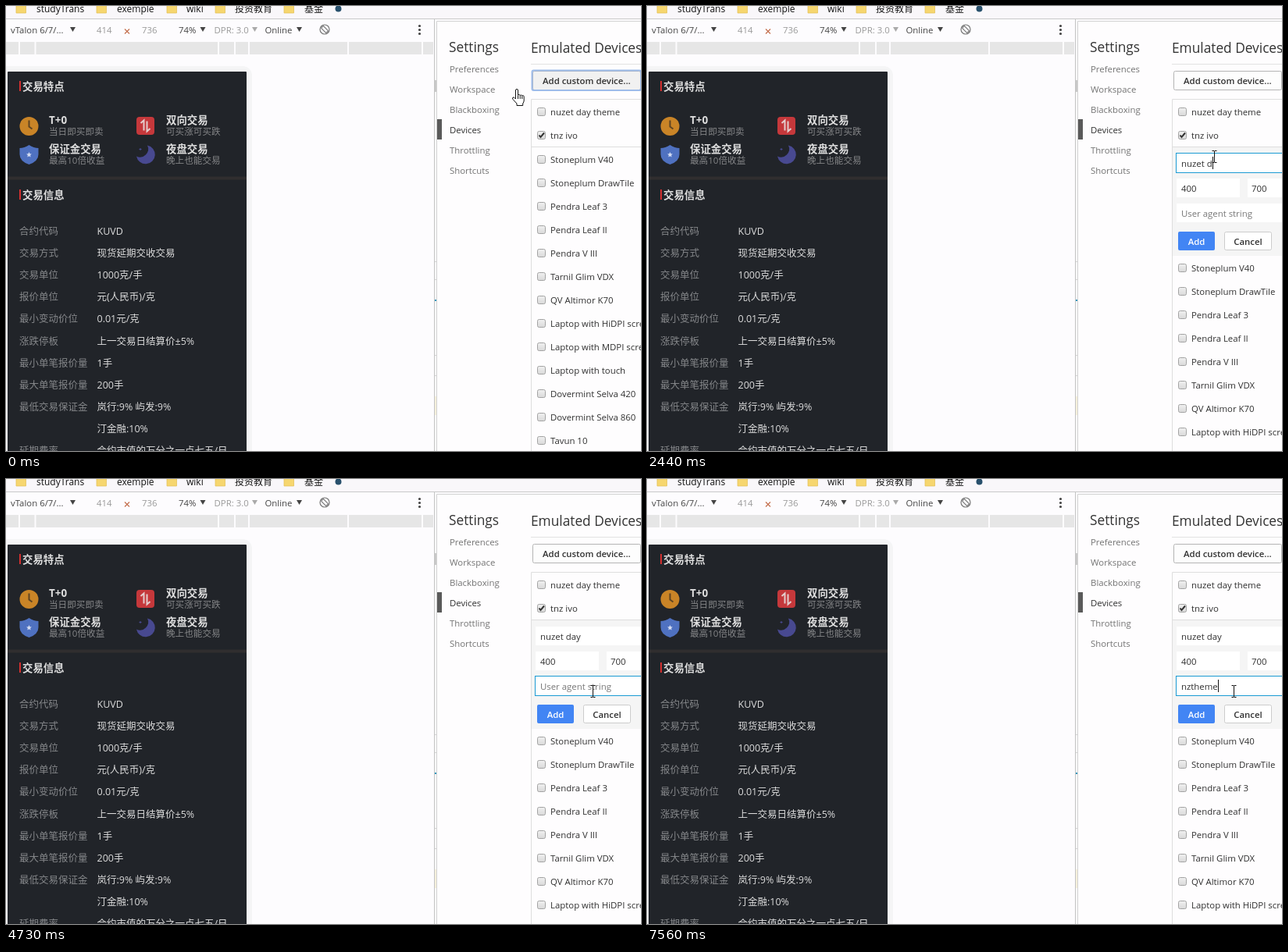
Animation of 813x570 px, one loop 7.99 s. Source, as an HTML page:

```html
<!DOCTYPE html>
<html lang="zh-CN">
<head>
<meta charset="utf-8">
<title>Device settings</title>
<style>
html, body { margin: 0; width: 100%; height: 100%; overflow: hidden; background: #fdfcfe; }
svg { display: block; width: 813px; height: 570px; }
text { font: 11.4px "Open Sans", "Noto Sans CJK SC", "Noto Sans CJK", sans-serif; fill: #303030; white-space: pre; }
.big { font-size: 17.3px; fill: #333; }
.book { font-size: 12px; fill: #111; }
.bar { fill: #444; }
.dim { fill: #999; }
.nav { fill: #737373; }
.semi { font-weight: 600; }
.hint { fill: #777; }
.head { font-size: 13.4px; font-weight: 700; fill: #dedede; }
.sub { font-size: 11.6px; fill: #858688; }
.key { font-size: 12.5px; fill: #85878a; }
.val { font-size: 12.5px; font-weight: 500; fill: #dcdcdc; }
</style>
</head>
<body>
<svg viewBox="0 0 813 570">
  <defs>
    <linearGradient id="grey" x2="0" y2="1"><stop stop-color="#f0f0f0"/><stop offset="1" stop-color="#d9d9d9"/></linearGradient>
    <path id="folder" d="M0 -3H5L6.500 -1H12.500V9H0Z" fill="#f6d66f" stroke="#e3bd52" stroke-width=".7"/>
    <path id="down" d="M0 0H7L3.500 6Z"/>
    <rect id="box" width="10" height="10" rx="2" fill="url(#grey)" stroke="#a3a3a3"/>
  </defs>
  <rect width="813" height="570" fill="#fdfcfe"/>
  <rect width="813" height="16" fill="#f9f7fa"/>

  <g id="bookmarks"></g>
  <circle cx="425.500" cy="3.500" r="4" fill="#28506c"/>
  <path d="M0 16.500H813" stroke="#c9c9c9"/>

  <!-- device toolbar -->
  <g id="toolbar"></g>
  <path d="M152 29.500l6 6m0 -6l-6 6" stroke="#c4704f" stroke-width="1.200"/>
  <g fill="#444">
    <use href="#down" x="82" y="27"/><use href="#down" x="248.500" y="27"/><use href="#down" x="372" y="27"/>
    <use href="#down" x="315" y="27" fill="#aaa"/>
    <circle cx="529.500" cy="25.500" r="1.600"/><circle cx="529.500" cy="30.500" r="1.600"/><circle cx="529.500" cy="35.500" r="1.600"/>
  </g>
  <g fill="none" stroke="#777" stroke-width="1.200">
    <circle cx="408" cy="30" r="6"/><rect x="406" y="25.500" width="4" height="9" rx="1" transform="rotate(-45 408 30)"/>
  </g>
  <path d="M0 46H547V62H0Z" fill="#e6e6e6"/>
  <path d="M17 46v16M37.500 46v16M272 46v16M293 46v16M311 46v16M438 46v16M533 46v16" stroke="#fdfcfe" stroke-width="2"/>

  <!-- phone -->
  <rect x="-10" y="77" width="325" height="510" rx="12" fill="#f5f5f6"/>
  <path d="M2 570V85q0 -1 1 -1H307q1 0 1 1V570Z" fill="#212429"/>
  <path d="M2 220.500H308" stroke="#302e2f" stroke-width="4"/>
  <path d="M18 96v13M18 235v13" stroke="#d32f2f" stroke-width="2"/>
  <circle cx="29.500" cy="154" r="12" fill="#c98427"/>
  <path d="M29.500 146.500v8l4 3" fill="none" stroke="#5f4423" stroke-width="2"/>
  <rect x="167" y="142" width="23" height="23" rx="4" fill="#c5383b"/>
  <path d="M172.500 150l4 -3.500v13M184.500 157l-4 3.500v-13" fill="none" stroke="#e4cccc" stroke-width="2"/>
  <path d="M29.500 178q6 4 12 4v8q0 9 -12 13q-12 -4 -12 -13v-8q6 0 12 -4Z" fill="#4f71c0"/>
  <path d="M29.500 187l1 2.200 2.400 .3 -1.800 1.600 .5 2.400 -2.100 -1.200 -2.100 1.200 .5 -2.400 -1.800 -1.600 2.400 -.3Z" fill="#d3dcf2"/>
  <path d="M181 178.500a12 12 0 1 1 -14 14a10.500 10.500 0 0 0 14 -14Z" fill="#484990"/>
  <path d="M172 182v3m-1.500 -1.500h3" stroke="#484990"/>
  <g id="phone"></g>

  <!-- page behind the settings panel -->
  <path d="M548.500 17V570" stroke="#c4c4c4"/>
  <path d="M549 95h3v15h-3Z" fill="#c8c8c8"/>
  <path d="M549 327.500h3m-3 23h3m-3 97h3m-3 26h3" stroke="#d4d4d4"/>
  <path d="M549 377h3" stroke="#3596bd" stroke-width="2"/>
  <path d="M549 500h3v24h-3Z" fill="#f6f1dc"/>

  <!-- settings panel -->
  <rect x="552" y="20" width="270" height="560" fill="#fefdfe"/>
  <path d="M551.500 570V19.500H813" fill="none" stroke="#d2d2d2"/>
  <path d="M552 145h6v26h-6Z" fill="#5a5a5a"/>
  <g id="nav"></g>
  <path d="M672 74.500H813" stroke="#e2e2e2"/>
  <rect id="addDevice" x="674.500" y="83.500" width="138" height="24" rx="2" stroke="#b4b4b4"/>
  <rect id="ring" x="673.500" y="82.500" width="139.500" height="25.500" rx="2" fill="none" stroke="#9dbcea" stroke-width="2"/>
  <text class="semi" x="687" y="100">Add custom device...</text>
  <path d="M672.500 570V119.500H813M673 180.500H813" fill="none" stroke="#dedede"/>
  <g id="top"></g>
  <path d="M682.500 165.500l2 2.500l4.500 -5.500" fill="none" stroke="#333" stroke-width="2"/>
  <g id="rest"></g>

  <g id="form">
    <rect x="673" y="181" width="140" height="139" fill="#f5f5f5"/>
    <path d="M678 221h81v24h-81ZM769 221h50v24h-50Z" fill="#fff"/>
    <rect id="nameBox" x="677.500" y="188.500" width="150" height="25" fill="#fff"/>
    <rect id="agentBox" x="677.500" y="252.500" width="150" height="25" fill="#fff"/>
    <text id="name" x="684" y="206"></text>
    <text x="684" y="238">400</text><text x="774" y="238">700</text>
    <text id="agent" x="684" y="270"></text>
    <rect id="add" x="680" y="289" width="47" height="24" rx="2"/>
    <text class="semi" x="703.500" y="306" text-anchor="middle" style="fill:#fff">Add</text>
    <rect x="739.500" y="289.500" width="60" height="23" rx="2" fill="#fff" stroke="#ccc"/>
    <text class="semi" x="769.500" y="306" text-anchor="middle">Cancel</text>
    <rect id="caret" width="1" height="16" fill="#111"/>
  </g>

  <path id="hand" fill="#fff" stroke="#111" stroke-linejoin="round" d="M5 13V2a1.500 1.500 0 0 1 3 0V8.500a1.400 1.400 0 0 1 2.700 .2a1.400 1.400 0 0 1 2.600 .6a1.300 1.300 0 0 1 2.400 .8V15q0 2 -1.500 4v2.500H6.500V19L1.500 13.500q-1.200 -1.800 0 -2.300t2 .3ZM8 9v4m2.700 -4v4m2.600 -3.500v3.500"/>
  <path id="beam" fill="none" stroke="#111" d="M-3 .5h2.500l.5 .5l.5 -.5h2.500M0 1v14M-3 15.500h2.500l.5 -.5l.5 .5h2.500"/>
</svg>
<script>
const $ = id => document.getElementById(id);
const label = (x, y, str, cls = '') => `<text x="${x}" y="${y}" class="${cls}">${str}</text>`;
const fill = (id, ...parts) => { $(id).innerHTML = parts.join(''); };

const folders = [[13, 'studyTrans', 39], [116, 'exemple', 142], [206, 'wiki', 231], [268, '投资教育', 293], [356, '基金', 382]];
fill('bookmarks', ...folders.map(([x, name, tx]) => `<use href="#folder" x="${x}"/>` + label(tx, 7.5, name, 'book')));

fill('toolbar',
  label(6, 34.5, 'vTalon 6/7/...', 'bar'), label(116, 34.5, '414', 'dim'), label(174, 34.5, '736', 'dim'),
  label(221, 34.5, '74%', 'bar'), label(266.5, 34.5, 'DPR: 3.0', 'dim'), label(331.5, 34.5, 'Online', 'bar'));

const features = [
  [55, 151, 'T+0', '当日即买即卖'], [205, 151, '双向交易', '可买涨可买跌'],
  [55, 188, '保证金交易', '最高10倍收益'], [205, 188, '夜盘交易', '晚上也能交易']];
const info = [
  ['合约代码', 'KUVD'], ['交易方式', '现货延期交收交易'], ['交易单位', '1000克/手'],
  ['报价单位', '元(人民币)/克'], ['最小变动价位', '0.01元/克'], ['涨跌停板', '上一交易日结算价±5%'],
  ['最小单笔报价量', '1手'], ['最大单笔报价量', '200手'], ['最低交易保证金', '岚行:9% 屿发:9%'],
  ['', '汀金融:10%'], ['延期费率', '合约市值的万分之一点七五/日']];
fill('phone',
  label(21, 108, '交易特点', 'head'), label(21, 247, '交易信息', 'head'),
  ...features.map(([x, y, head, sub]) => label(x, y, head, 'head') + label(x, y + 14, sub, 'sub')),
  ...info.map(([key, val], i) => label(17, 293 + i * 28.1, key, 'key') + label(116.5, 293 + i * 28.1, val, 'val')));

const pages = ['Preferences', 'Workspace', 'Blackboxing', 'Devices', 'Throttling', 'Shortcuts'];
fill('nav', label(567, 59, 'Settings', 'big'), label(672, 60, 'Emulated Devices', 'big'),
  ...pages.map((p, i) => label(568, 85 + i * 26, p, p === 'Devices' ? '' : 'nav')));

const row = (name, y) => `<use href="#box" x="680.5" y="${y - 5.5}"/>` + label(697, y + 4, name);
const devices = [
  'Stoneplum V40', 'Stoneplum DrawTile', 'Pendra Leaf 3', 'Pendra Leaf II', 'Pendra V III',
  'Tarnil Glim VDX', 'QV Altimor K70', 'Laptop with HiDPI screen', 'Laptop with MDPI screen',
  'Laptop with touch', 'Dovermint Selva 420', 'Dovermint Selva 860', 'Tavun 10'];
fill('top', row('nuzet day theme', 136), row('tnz ivo', 166));
fill('rest', ...devices.map((d, i) => row(d, 197 + i * 30)));

// Each track lists [start ms, value...]; values hold until the next start.
const LOOP = 7990;
const typed = (str, steps) => [[0, ''], ...steps.map(([t, n]) => [t, str.slice(0, n)])];
const blink = (...times) => [[0, 0], ...times.map((t, i) => [t, 1 - i % 2])];
const tracks = {
  cursor: [
    [0, 'hand', 647.5, 106], [150, 'hand', 684, 98], [310, 'hand', 705.5, 91.5], [450, 'hand', 709, 97],
    [590, 'hand', 716, 128], [730, 'beam', 724.5, 191], [870, 'beam', 726.5, 185],
    [3320, 'beam', 731.5, 202], [3460, 'beam', 742.5, 230], [3600, 'beam', 755.5, 260],
    [3730, 'hand', 752, 292], [3860, 'beam', 761.5, 267], [4140, 'beam', 751.5, 264]],
  button: [[0, 'focus'], [310, 'hover'], [590, 'plain']],
  form: [[0, 0], [310, 1]],
  field: [[0, 'name'], [4300, 'agent']],
  agentHover: [[0, 0], [3600, 1], [3730, 0], [3860, 1]],
  name: typed('nuzet day', [[1700, 1], [1850, 2], [1990, 4], [2130, 5], [2440, 7], [2590, 8], [2740, 9]]),
  agent: typed('nztheme', [[5130, 1], [5870, 2], [6700, 3], [7000, 4], [7170, 5], [7420, 6], [7560, 7]]),
  caret: blink(310, 870, 1440, 3320, 3860, 4730, 5130, 5720, 5870, 6420, 6700)
};
const at = (track, t) => tracks[track].findLast(k => k[0] <= t).slice(1);
const show = (id, on) => $(id).setAttribute('visibility', on ? 'inherit' : 'hidden');

function setField(id, str, hint) {
  $(id).textContent = str || hint;
  $(id).setAttribute('class', str ? '' : 'hint');
}

function draw(now) {
  const t = now % LOOP;
  const [shape, x, y] = at('cursor', t);
  for (const id of ['hand', 'beam']) show(id, id === shape);
  $(shape).setAttribute('transform', `translate(${x} ${y})`);

  const [button] = at('button', t);
  show('ring', button === 'focus');
  $('addDevice').setAttribute('fill', button === 'plain' ? '#fdfdfd' : '#f1f1f1');

  const [open] = at('form', t);
  show('form', open);
  $('rest').setAttribute('transform', `translate(0 ${open ? 139 : 0})`);

  const [name] = at('name', t), [agent] = at('agent', t), [field] = at('field', t);
  setField('name', name, 'Device name');
  setField('agent', agent, 'User agent string');
  $('add').setAttribute('fill', name ? '#4285f4' : '#b3cefb');

  const blue = '#1b9bd3';
  $('nameBox').setAttribute('stroke', field === 'name' ? blue : '#f5f5f5');
  $('agentBox').setAttribute('stroke', field === 'agent' ? blue : at('agentHover', t)[0] ? '#d8d8d8' : '#f5f5f5');

  const str = field === 'name' ? name : agent;
  const width = str ? $(field).getComputedTextLength() : 0;
  show('caret', open && at('caret', t)[0]);
  $('caret').setAttribute('x', Math.round(684 + width));
  $('caret').setAttribute('y', field === 'name' ? 193 : 257);
}

const start = performance.now();
function tick() {
  draw(performance.now() - start);
  requestAnimationFrame(tick);
}
tick();
</script>
</body>
</html>
```
